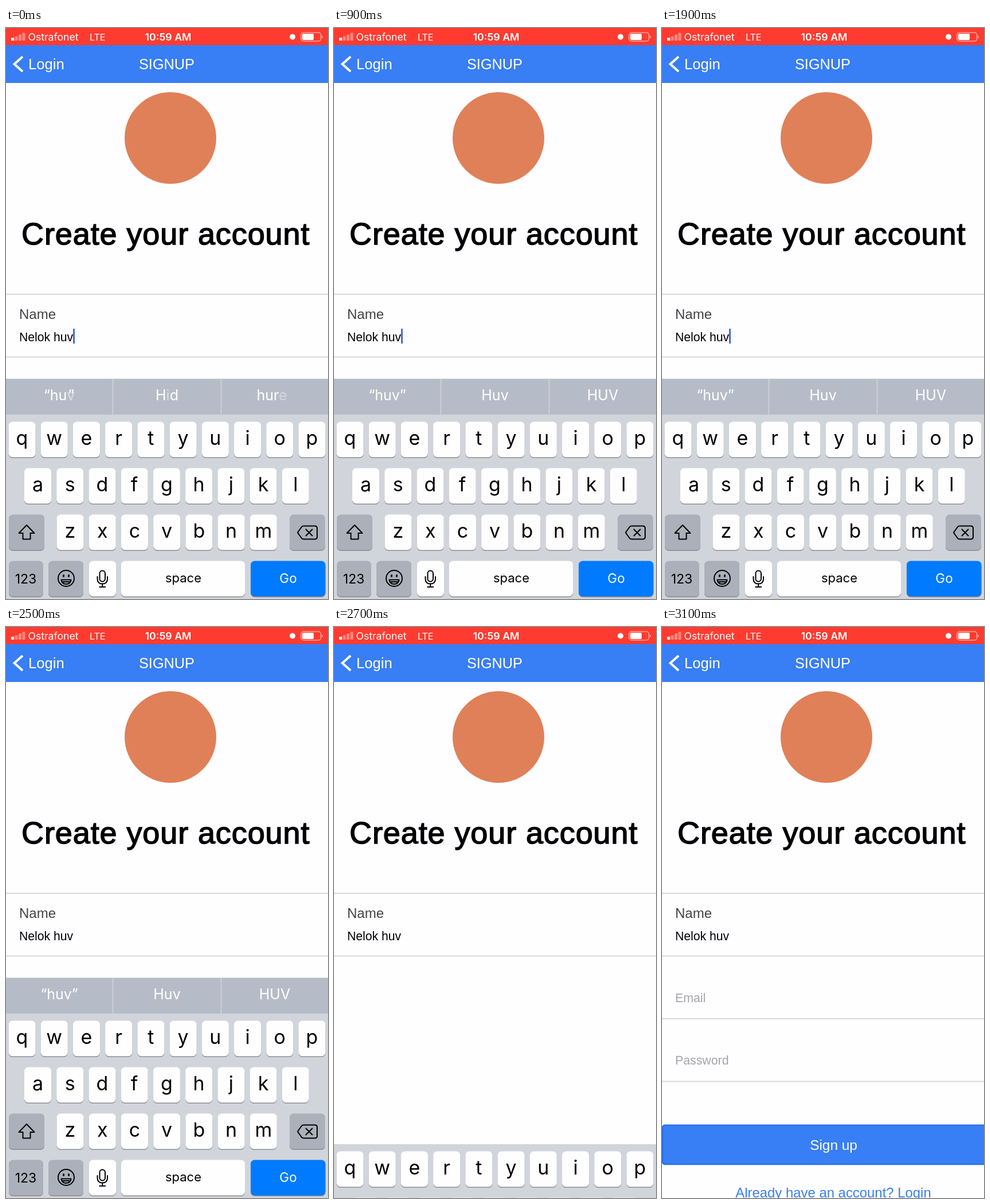
These frames come from a looping animation (562x997 px, 5.7 s). An HTML page:

```html
<!DOCTYPE html>
<html lang="en">
<head>
<meta charset="utf-8">
<title>Signup form</title>
<style>
html, body { margin: 0; width: 100%; height: 100%; overflow: hidden; background: #fefdff; }
svg { display: block; font-family: "Liberation Sans", Arial, sans-serif; }
.ui { font-family: Inter, Roboto, sans-serif; }
.white { fill: #fff; }
.mid { text-anchor: middle; }
.line { fill: none; stroke: #000; stroke-width: 2; stroke-linejoin: round; stroke-linecap: round; }
.rule { stroke: #d9d8dd; stroke-width: 2; }
.letter { font-size: 34px; font-weight: 400; }
.hint { font-size: 25px; font-weight: 400; }
</style>
</head>
<body>
<svg width="562" height="997" viewBox="0 0 562 997">
  <rect width="562" height="997" fill="#fefdff"/>
  <circle cx="287" cy="192" r="80" fill="#e08058"/>
  <text x="27" y="377.5" font-size="54" letter-spacing=".9" stroke="#000" stroke-width="1.5">Create your account</text>
  <path class="rule" d="M0 465H562M0 574.5H562"/>
  <text x="23" y="508" font-size="24" fill="#444">Name</text>
  <text x="23" y="547" font-size="21.2">Nelok huv</text>
  <rect id="caret" x="117" y="525" width="3" height="26" fill="#416fd3"/>

  <g id="form">
    <path class="rule" d="M0 684H562M0 793.5H562"/>
    <g font-size="21.3" fill="#a5a4a8">
      <text x="23" y="655">Email</text>
      <text x="23" y="764">Password</text>
    </g>
    <rect x=".75" y="869.5" width="575" height="69" rx="4" fill="#387ef5" stroke="#1762e0" stroke-width="1.5"/>
    <text class="white mid" x="299.5" y="913" font-size="24.4">Sign up</text>
    <text class="mid" x="299" y="996" font-size="23.9" fill="#387ef5">Already have an account? Login</text>
  </g>

  <rect width="562" height="30" fill="#ff3b30"/>
  <rect y="30" width="562" height="66" fill="#387ef5"/>
  <g class="ui white">
    <path d="M9 17h5v5h-5z"/>
    <path opacity=".4" d="M15.5 14.5h5v7.5h-5zM22 11.5h5V22h-5zM28.5 8.5h5V22h-5z"/>
    <text x="38.5" y="22" font-size="17.6">Ostrafonet</text>
    <text x="146" y="22" font-size="16">LTE</text>
    <text class="mid" x="283" y="22" font-size="17.8" font-weight="600">10:59 AM</text>
    <circle cx="500" cy="15.5" r="5"/>
    <rect x="515" y="8" width="34.5" height="15" rx="4" fill="none" stroke="#fff" stroke-opacity=".55" stroke-width="1.5"/>
    <rect x="517" y="10" width="20" height="11" rx="2"/>
    <path opacity=".55" d="M551 13q2 .5 2 2.5t-2 2.5z"/>
  </g>
  <path d="M29 50L14.5 63L29 76" fill="none" stroke="#fff" stroke-width="4"/>
  <text class="white" x="39" y="72" font-size="25.6">Login</text>
  <text class="white mid" x="280.5" y="72" font-size="25.3">SIGNUP</text>

  <g id="bar" class="ui">
    <rect y="612.5" width="562" height="63" fill="#b6bcc7"/>
    <path d="M186.5 612.5v63M375.5 612.5v63" stroke="#d1d5db" stroke-width="1.5"/>
    <g id="before" class="hint white mid">
      <text x="93" y="650">“hu<tspan fill-opacity=".5">v</tspan><tspan dx="-12">”</tspan></text>
      <text x="281" y="650">H<tspan fill-opacity=".5">i</tspan>d</text>
      <text x="464" y="650">hur<tspan fill-opacity=".4">e</tspan></text>
    </g>
    <g id="after" class="hint white mid">
      <text x="93" y="650">“huv”</text>
      <text x="281" y="650">Huv</text>
      <text x="469" y="650">HUV</text>
    </g>
  </g>

  <g id="keys" class="ui">
    <rect y="675" width="562" height="330" fill="#d1d5db"/>
    <g id="caps"></g>
    <path class="line" d="M36 868L49.5 882H42.5V892.5H29.5V882H22.5Z"/>
    <path class="line" d="M519.5 869.5H539q4 0 4 4v15q0 4-4 4H519.5q-2 0-3.5-1.5L510 882.5q-1.5-1.5 0-3L516 871q1.5-1.5 3.5-1.5ZM523.5 875.5l11 11m0-11l-11 11"/>
    <circle class="line" cx="105" cy="961" r="14"/>
    <path class="line" d="M96.5 963.5h17q-1 7.5-8.5 7.5t-8.5-7.5zM98 967h14"/>
    <ellipse cx="100.5" cy="956.5" rx="1.6" ry="2.5"/>
    <ellipse cx="109.500" cy="956.5" rx="1.6" ry="2.5"/>
    <rect class="line" x="163.5" y="947.5" width="9.5" height="19" rx="4.75"/>
    <path class="line" d="M159.5 958v4q0 8.5 8.75 8.5t8.75-8.5v-4M168.250 970.5v5.5m-5 0h10"/>
    <text class="mid" x="34.5" y="970" font-size="23">123</text>
    <text class="mid" x="309.5" y="968" font-size="22">space</text>
    <text class="white mid" x="492.5" y="969" font-size="22.5">Go</text>
  </g>
</svg>
<script>
const $ = id => document.getElementById(id);
const LOOP = 5700, STEP = 100, PITCH = 56.22;
const clamp = v => Math.max(0, Math.min(1, v));

function cap(x, y, w, fill = '#fefefe') {
  const rect = (dy, color) => `<rect x="${x}" y="${y + dy}" width="${w}" height="62" rx="7" fill="${color}"/>`;
  return rect(2, '#8a8d93') + rect(0.5, fill);
}

function row(letters, x, y) {
  return [...letters].map((ch, i) => {
    const left = x + i * PITCH;
    return cap(left, y, 47) +
      `<text class="letter mid" x="${left + 23.5}" y="${y + 41}">${ch}</text>`;
  }).join('');
}

const gray = '#abb0ba';
$('caps').innerHTML =
  row('qwertyuiop', 4.5, 687) + row('asdfghjkl', 32, 768) + row('zxcvbnm', 88.5, 849) +
  cap(5, 849, 62, gray) + cap(495, 849, 62, gray) +
  cap(5, 930, 60, gray) + cap(74, 930, 61, gray) + cap(145, 930, 47) +
  cap(201, 930, 216) + cap(427, 930, 130.5, '#007aff');

// Caret fades out, rests, and fades back in once a second.
function caretAlpha(t) {
  if (t >= 2500) return 0;
  const p = t % 1000;
  return p < 600 ? clamp(1 - (p - 100) / 400) : clamp((p - 600) / 300);
}

function draw(now) {
  const t = Math.floor(now % LOOP / STEP) * STEP;
  const u = clamp((t - 2541.5) / 282);
  const drop = Math.round(385 * u * u * (3 - 2 * u));
  const tuck = Math.min(63, Math.round(drop * 0.35)); // bar slides behind the keys
  const mix = clamp(t / 200);

  $('caret').setAttribute('opacity', caretAlpha(t));
  $('before').setAttribute('opacity', 1 - mix);
  $('after').setAttribute('opacity', mix);
  $('keys').setAttribute('transform', `translate(0 ${drop})`);
  $('bar').setAttribute('transform', `translate(0 ${drop + tuck})`);
  $('form').setAttribute('visibility', t >= 2900 ? 'visible' : 'hidden');
}

const start = performance.now();
function tick() {
  draw(performance.now() - start);
  requestAnimationFrame(tick);
}
tick();
</script>
</body>
</html>
```
